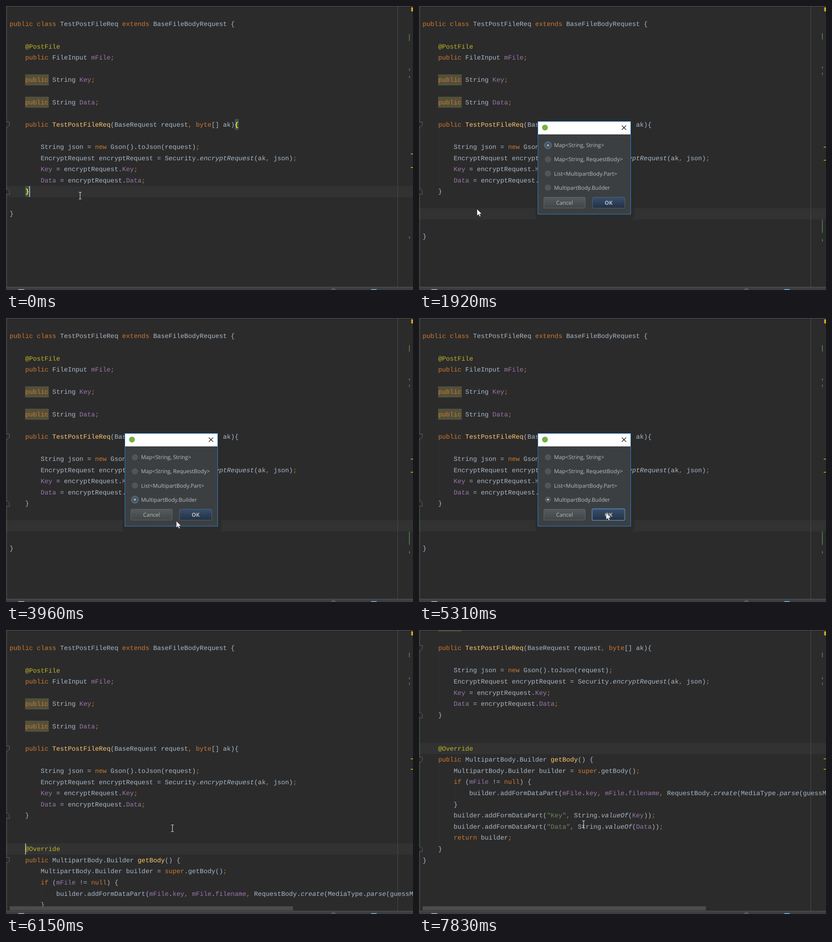
These frames come from a looping animation (895x626 px, 8000 ms). An HTML page:

```html
<!DOCTYPE html>
<html lang="en">
<head>
<meta charset="utf-8">
<title>Code generator</title>
<style>
  html, body { margin: 0; width: 100%; height: 100%; overflow: hidden; background: #2b2b2b; }
  svg { display: block; }
  text { white-space: pre; text-rendering: geometricPrecision; }
  .code { font: 14.22px "Liberation Mono", monospace; fill: #a9b7c6; }
  .ui { font: 12px "Open Sans", sans-serif; fill: #bbb; }
  .string { fill: #6a8759; }
  .note { fill: #bbb529; }
  .key { fill: #cc7832; }
  .field { fill: #9876aa; }
  .method { fill: #ffc66d; }
  .static { font-style: italic; }
  .brace { font-weight: bold; fill: #ffef28; }
  .fold { fill: #2b2b2b; stroke: #606366; }
  .guide { stroke: #3d3d3d; stroke-dasharray: 1 2; }
</style>
</head>
<body>
<svg id="stage" width="895" height="626" viewBox="0 0 895 626"></svg>
<script>
const LOOP = 8000, LEFT = 8, CHAR = 8.533, ROW = 24.6, TOP = 27.7;
const colX = c => LEFT + c * CHAR;
const rowY = r => TOP + r * ROW;

const head = `public class TestPostFileReq extends BaseFileBodyRequest {

    @PostFile
    public FileInput mFile;

    public String Key;

    public String Data;

    public TestPostFileReq(BaseRequest request, byte[] ak){

        String json = new Gson().toJson(request);
        EncryptRequest encryptRequest = Security.encryptRequest(ak, json);
        Key = encryptRequest.Key;
        Data = encryptRequest.Data;
    }`;
const body = `    @Override
    public MultipartBody.Builder getBody() {
        MultipartBody.Builder builder = super.getBody();
        if (mFile != null) {
            builder.addFormDataPart(mFile.key, mFile.filename, RequestBody.create(MediaType.parse(guessMimeType(
        }
        builder.addFormDataPart("Key", String.valueOf(Key));
        builder.addFormDataPart("Data", String.valueOf(Data));
        return builder;
    }`;

const kinds = ['string', 'note', 'key', 'field', 'method', 'static'];
const syntax = new RegExp([
  /("[^"]*")/, /(@\w+)/,
  /(\b(?:public|class|extends|new|byte|super|if|null|return)\b|[;,])/,
  /(\b(?:mFile|Key|Data|key|filename)\b)/,
  /(TestPostFileReq(?=\()|getBody(?=\(\) \{))/,
  /((?:encryptRequest|create|parse|valueOf)(?=\())/
].map(r => r.source).join('|'), 'g');

const esc = s => s.replace(/&/g, '&amp;').replace(/</g, '&lt;');
const rect = (x, y, w, h, fill, more = '') =>
  `<rect x="${x}" y="${y}" width="${w}" height="${h}" fill="${fill}" ${more}/>`;
const span = (s, col, kind = '') => s && `<tspan x="${colX(col)}" class="${kind}">${esc(s)}</tspan>`;

function codeLine(line, row) {
  let out = '', at = 0;
  for (const m of line.matchAll(syntax)) {
    out += span(line.slice(at, m.index), at);
    out += span(m[0], m.index, kinds[m.slice(1).findIndex(Boolean)]);
    at = m.index + m[0].length;
  }
  out += span(line.slice(at), at);
  return `<text class="code" y="${rowY(row) + 16.6}">${out}</text>`;
}
const block = (src, row) => src.split('\n').map((l, i) => codeLine(l, row + i)).join('');
const guide = (col, from, to) =>
  `<path class="guide" d="M${Math.round(colX(col)) + 3.5} ${rowY(from)}V${rowY(to)}"/>`;
const fold = (row, dir) =>
  `<path class="fold" transform="translate(0 ${rowY(row) + 12.3}) scale(1 ${dir})" d="M-1 -6H7.5V1.5L2.5 6.5L-1 3"/>`;
const matched = (c, col, row) => rect(colX(col), rowY(row), 9, 24, '#3b514d') +
  `<text class="code brace" x="${colX(col)}" y="${rowY(row) + 16.6}">${c}</text>`;

const options = ['Map<String, String>', 'Map<String, RequestBody>', 'List<MultipartBody.Part>', 'MultipartBody.Builder'];
const radio = (label, i) => `<g transform="translate(283.5 ${307 + i * 31.1})">
  <circle id="ring${i}" r="8" fill="#3b5f84" stroke="#56789b"/>
  <circle r="6" fill="#505456" stroke="#626567"/>
  <circle id="dot${i}" r="2" fill="#c8c8c8"/>
  <text class="ui" x="13.5" y="4.3">${esc(label)}</text></g>`;
const button = (x, w, fill, edge, label, bold) =>
  rect(x + .5, 421.5, w - 1, 24, `url(#${fill})`, `stroke="${edge}" rx="2"`) +
  `<text class="ui" x="${x + w / 2}" y="438" text-anchor="middle" font-weight="400" style="font-weight:${bold}">${label}</text>`;
const shade = (id, a, b) => `<linearGradient id="${id}" x2="0" y2="1">
  <stop stop-color="${a}"/><stop offset="1" stop-color="${b}"/></linearGradient>`;

document.getElementById('stage').innerHTML = `
<defs>${shade('grey', '#555a5c', '#414648')}${shade('blue', '#384f6b', '#233143')}
  <clipPath id="view"><rect y="1" width="895" height="618"/></clipPath></defs>
${rect(0, 0, 895, 626, '#2b2b2b')}
<g clip-path="url(#view)">
  <rect id="current" width="895" height="24.6" fill="#323232"/>
  <rect id="shadow" x="256" y="262" width="218" height="209" rx="9" fill="#2b2b2b" opacity=".9"/>
  ${rect(861, 0, 1, 619, '#4b4b4b')}${rect(1, 0, 1, 619, '#555')}
  <rect id="added" x="1" width="1" fill="#47694c"/>
  <g id="code">
    ${[5, 7].map(r => rect(42, rowY(r), 52, 24.4, '#52503a')).join('')}
    ${guide(4, 10, 15)}${fold(9, 1)}${fold(15, -1)}
    ${block(head, 0)}
    <g id="body">${guide(4, 20, 27)}${guide(8, 22, 23)}${fold(19, 1)}${fold(27, -1)}${block(body, 18)}</g>
    <g id="end">${codeLine('}', 0)}</g>
    <g id="match">${matched('{', 58, 9)}${matched('}', 4, 15)}</g>
  </g>
  <rect id="caret" width="1.6" height="24.4" fill="#ccc"/>
  <rect id="scrollbar" x="8" y="609" width="623" height="9" fill="#505050" opacity=".9"/>
  <g id="stripe"></g>
</g>
<rect id="status" x="891" y="3" width="4" height="9"/>
${rect(0, 0, 895, 1, '#555')}
${rect(0, 619, 895, 7, '#3c3f41')}${rect(0, 619, 895, 1, '#555')}
${rect(27, 624, 13, 2, '#9a9da0')}${rect(803, 624, 12, 2, '#6f9fc4')}
<circle cx="720" cy="629" r="5.5" fill="none" stroke="#9a9da0"/>
<g id="dialog">
  ${rect(261.5, 254.5, 204, 204.5, '#3c3f41', 'stroke="#2a84d2"')}
  ${rect(262, 255, 203, 28, '#fff')}
  <circle cx="277" cy="268" r="6.5" fill="#78b043"/>
  <path d="M446 263.5L455.5 273M455.5 263.5L446 273" stroke="#111" stroke-width="1.2"/>
  ${options.map(radio).join('')}
  ${button(274, 92, 'grey', '#646768', 'Cancel', 400)}
  ${button(381, 72, 'blue', '#4a6580', 'OK', 700)}
  <rect id="focus" x="380.5" y="420.5" width="72" height="25.5" rx="3" fill="none" stroke="#4a75a3" stroke-width="2"/>
</g>
<path id="arrow" d="M.5 .5V15.5L4 12.3L6.4 17.3L8.8 16.2L6.5 11.3H11Z" fill="#fff" stroke="#222" stroke-width=".7"/>
<path id="beam" d="M-3 -7.5H-1L0 -6.5L1 -7.5H3M0 -6.5V6.5M-3 7.5H-1L0 6.5L1 7.5H3" fill="none" stroke="#d8d8d8" stroke-width="1.2"/>`;

const el = {};
document.querySelectorAll('[id]').forEach(e => el[e.id] = e);
const show = (e, on) => e.setAttribute('visibility', on ? 'inherit' : 'hidden');
const move = (e, x, y) => e.setAttribute('transform', `translate(${x} ${y})`);

// Value of the last [time, value] pair reached.
const at = (steps, t) => steps.reduce((v, s) => t >= s[0] ? s[1] : v, null);

const ENTER1 = 1180, ENTER2 = 1400, OPEN = 1920, CLOSE = 5370, INSERT = 5430;
const currentRow = [[0, 15], [ENTER1, 16], [ENTER2, 17], [INSERT, 18]];
const endRow = [[0, 17], [ENTER1, 18], [ENTER2, 19], [INSERT, 28]];
const scroll = [[0, 0], [6300, 3], [6390, 6], [6720, 9]];
const caretOn = [[0, 1], [900, 0], [ENTER1, 1], [OPEN, 0], [INSERT, 1], [6860, 0], [7370, 1], [7830, 0]];
const statusFill = [[0, '#d0a020'], [ENTER1, '#777'], [1770, '#d0a020'], [INSERT, '#777'], [5670, '#d0a020']];
const ringOn = [[0, 0], [3600, 3], [5220, -1]];

// Stripe marks: change, change height, greys, warnings, new lines.
const marks = [
  [0, { change: [62, 15], greys: [138, 154, 508], warns: [325, 355] }],
  [ENTER1, { change: [61, 14], greys: [135, 151, 511], warns: [317, 347], fresh: [484, 15] }],
  [ENTER2, { change: [60, 14], greys: [133, 147, 514], warns: [310, 339], fresh: [471, 29] }],
  [INSERT, { change: [50, 10], greys: [104, 116], warns: [283, 306] }]
];
function drawStripe(m) {
  const green = ([y, h]) => rect(886, y, 2, h, '#47724d');
  el.stripe.innerHTML = green(m.change) + (m.fresh ? green(m.fresh) : '') +
    m.greys.map(y => rect(886.5, y, 1.5, 5, '#777')).join('') +
    m.warns.map(y => rect(890, y, 5, 2, '#be9117')).join('');
}

// Pointer moves: from, to, steps, then start, control and end points.
const moves = [
  [60, 350, 4, 150, 427, 94, 447, 127, 447],
  [2950, 3690, 10, 135, 446, 230, 440, 281, 399],
  [3960, 4630, 11, 374, 447, 395, 470, 411, 429],
  [5670, 6150, 7, 408, 429, 385, 431, 366, 437],
  [6210, 6390, 3, 365, 436, 364, 435, 363, 435],
  [6480, 6570, 2, 363, 434, 362, 434, 362, 434],
  [7010, 7010, 1, 362, 428, 362, 428, 362, 428]
];
function pointer(t) {
  const m = moves.filter(m => t >= m[0]).pop();
  if (!m) return [163, 418];
  const [from, to, n, x0, y0, cx, cy, x1, y1] = m;
  const u = t >= to ? 1 : Math.floor((t - from) / (to - from) * (n - 1)) / (n - 1);
  const curve = (a, b, c) => Math.round((1 - u) ** 2 * a + 2 * u * (1 - u) * b + u * u * c);
  return [curve(x0, cx, x1), curve(y0, cy, y1)];
}

let lastMarks;
function render(t) {
  const top = at(scroll, t), row = at(currentRow, t) - top;
  const open = t >= OPEN && t < CLOSE, inserted = t >= INSERT;
  move(el.code, 0, -top * ROW);
  move(el.end, 0, at(endRow, t) * ROW);
  move(el.current, 0, rowY(row));
  move(el.caret, t < ENTER1 ? 51.2 : 42.2, rowY(row));
  show(el.caret, at(caretOn, t));
  show(el.match, t < ENTER1);
  show(el.body, inserted);
  show(el.scrollbar, inserted);

  const addedRows = t < ENTER1 ? 0 : t < ENTER2 ? 1 : inserted ? 12 : 2;
  el.added.setAttribute('y', rowY(16 - top));
  el.added.setAttribute('height', addedRows * ROW);
  el.status.setAttribute('fill', at(statusFill, t));
  const m = at(marks, t);
  if (m !== lastMarks) drawStripe(lastMarks = m);

  show(el.dialog, open);
  show(el.shadow, open);
  options.forEach((_, i) => show(el['ring' + i], at(ringOn, t) === i));
  show(el.dot0, t < 3810);
  show(el.dot1, false);
  show(el.dot2, false);
  show(el.dot3, t >= 3690);
  show(el.focus, t >= 5220);

  const [x, y] = pointer(t);
  move(el.arrow, x, y);
  move(el.beam, x, y);
  show(el.arrow, open);
  show(el.beam, !open);
}

const start = performance.now();
function tick() {
  render((performance.now() - start) % LOOP);
  requestAnimationFrame(tick);
}
tick();
</script>
</body>
</html>
```
